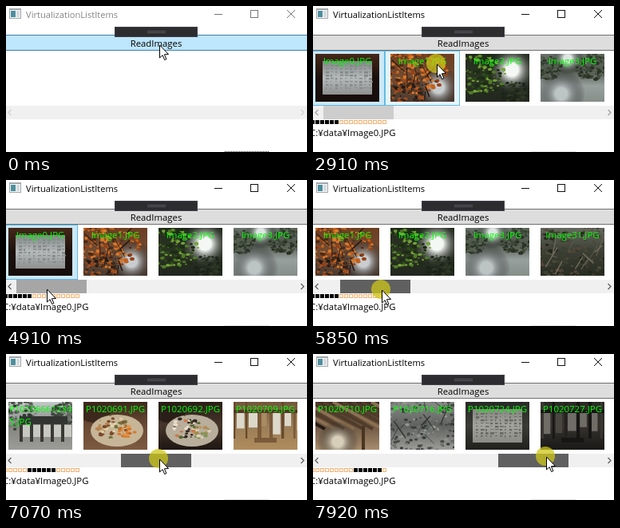
An HTML page with a canvas for the animation above (8000 ms loop, 377x183 px).

```html
<!DOCTYPE html>
<html lang="en">
<head>
<meta charset="utf-8">
<title>VirtualizationListItems</title>
<style>
html, body { margin: 0; width: 100%; height: 100%; overflow: hidden; background: #fff; }
canvas { display: block; }
</style>
</head>
<body>
<canvas id="stage" width="377" height="183"></canvas>
<script>
const W = 377, H = 183, LOOP = 8000, TICK = 76.8;
const PITCH = 94, COUNT = 16, VISIBLE = 4, PW = 80, PH = 60;
const TRACK_X = 13, STEP = 351 / COUNT, GRAB_X = 53;
const LOADED = 950, BAR_HOVER = 4760, DRAG = 5460;
const FONT = '"Open Sans", "Noto Sans", sans-serif';
const g = document.getElementById('stage').getContext('2d');

// pointer moves: start, end, target x, target y
const moves = [
  [0, 1, 192, 49], [2120, 2227, 179, 54], [2304, 2688, 155, 73],
  [3303, 3610, 62, 120], [3686, 3917, 212, 112], [4147, 4378, 50, 117],
  [4608, 4838, 51, 137], [5376, 5453, 53, 137],
  [5453, 6374, 133, 139], [6374, 7066, 192, 132], [7066, 7910, 292, 129]
];
// button down, button up, item selected afterwards
const clicks = [[710, 950, 0], [2910, 3150, 1], [3610, 3760, 0], [3990, 4140, 2], [4450, 4610, 0]];
const names = ['Image0', 'Image1', 'Image2', 'Image3', 'Image31', 'Image32', 'P101066612345',
  'P1020691', 'P1020692', 'P1020709', 'P1020710', 'P1020716', 'P1020724', 'P1020727'];

function rect(c, color, x, y, w, h) {
  c.fillStyle = color;
  c.fillRect(x, y, w, h);
}
function box(c, color, x, y, w, h) {
  c.strokeStyle = color;
  c.lineWidth = 1;
  c.strokeRect(x + 0.5, y + 0.5, w - 1, h - 1);
}
function trace(c, pts) {
  c.beginPath();
  for (let i = 0; i < pts.length; i += 2) c.lineTo(pts[i], pts[i + 1]);
}
function line(c, color, width, ...pts) {
  trace(c, pts);
  c.strokeStyle = color;
  c.lineWidth = width;
  c.stroke();
}
function oval(c, color, x, y, rx, ry = rx) {
  c.fillStyle = color;
  c.beginPath();
  c.ellipse(x, y, rx, ry, 0, 0, Math.PI * 2);
  c.fill();
}
function text(s, x, y, color, size, align = 'left') {
  g.font = `${size}px ${FONT}`;
  g.textAlign = align;
  g.fillStyle = color;
  g.fillText(s, x, y);
}

// --- photographs, suggested by tones and seeded shapes ---
let seed = 4711;
function rnd(a = 1, b = 0) {
  seed = (seed * 16807) % 2147483647;
  return b + (a - b) * seed / 2147483647;
}
const pick = list => list[Math.floor(rnd(list.length))];

function fade(c, colors, inset = 0) {
  const f = c.createLinearGradient(0, inset, 0, PH - inset);
  colors.forEach((color, i) => f.addColorStop(i / (colors.length - 1), color));
  rect(c, f, inset, inset, PW - 2 * inset, PH - 2 * inset);
}
function glow(c, x, y, r, color) {
  const f = c.createRadialGradient(x, y, r / 4, x, y, r);
  f.addColorStop(0, color);
  f.addColorStop(1, 'transparent');
  rect(c, f, 0, 0, PW, PH);
}
// leaves lie thickest around a centre
function leaves(c, colors, x, y, spread, n = 150) {
  for (let i = 0; i < n; i++) {
    const a = rnd(Math.PI * 2), d = spread * Math.sqrt(rnd()), s = rnd(3, 0.8);
    oval(c, pick(colors), x + d * 1.3 * Math.cos(a), y + d * Math.sin(a), s, s * 0.7);
  }
}
function twigs(c, color, n) {
  for (let i = 0; i < n; i++) {
    const x = rnd(PW), y = rnd(PH);
    line(c, color, rnd(1.6, 0.4), x, y, x + rnd(16, -16), y - rnd(26, 6));
  }
}
const grove = (tones, colors, twig, n) => c => {
  fade(c, tones);
  leaves(c, colors, 40, 32, 44, 260);
  twigs(c, twig, n);
};
const board = (frame, paper, ink) => c => {
  fade(c, frame);
  fade(c, paper, 9);
  for (let y = 14; y < 46; y += 4)
    for (let x = 13; x < 68; x += 6) rect(c, ink, x, y, rnd(5, 1), rnd(3, 0.6));
};
const dish = (table, plate, food, garnish) => c => {
  fade(c, table);
  oval(c, table[0], 14, 12, 20, 14);
  oval(c, plate, 42, 36, 33, 20);
  leaves(c, food, 36, 32, 15, 50);
  leaves(c, garnish, 54, 38, 8, 24);
};
const room = (tones, wood, light) => c => {
  fade(c, tones);
  for (let x = 4; x < PW; x += 15) {
    rect(c, pick(light), x, 14, rnd(12, 7), rnd(28, 16));
    rect(c, pick(wood), x - 4, 0, rnd(5, 2), 46);
  }
  rect(c, wood[0], 0, 10, PW, 4);
  rect(c, pick(wood), 26, 45, 28, 6);
};

const scenes = [
  board(['#45281a', '#1c100c', '#150d0a'], ['#7f8585', '#b6baba', '#8e9090'], '#858989'),
  c => {
    fade(c, ['#6d3e22', '#6f4c34', '#4b3b30']);
    glow(c, 60, 42, 28, '#c9cdd0');
    leaves(c, ['#c2601c', '#da7a2c', '#9a4217', '#4a2a18'], 30, 18, 32, 260);
    leaves(c, ['#3a2a1e', '#a04e20', '#231a14'], 20, 54, 18, 90);
    twigs(c, '#241b15', 14);
  },
  c => {
    fade(c, ['#222b1c', '#2b3324', '#22261f']);
    glow(c, 58, 20, 32, '#f4f7f4');
    leaves(c, ['#2b4a18', '#527d28', '#74a238', '#1c2c14'], 16, 26, 26, 170);
    leaves(c, ['#1c2418', '#2d3826'], 62, 48, 14, 90);
  },
  c => {
    fade(c, ['#6b726c', '#4d554b', '#98a09e', '#868e8a']);
    glow(c, 34, 6, 20, '#dfe4e4');
    leaves(c, ['#2a3326', '#3d4838', '#556050'], 8, 18, 15);
    leaves(c, ['#2a3326', '#3d4838', '#59624f'], 66, 16, 17);
    glow(c, 26, 50, 30, '#bcc4c4');
  },
  ...Array(2).fill(grove(['#65685f', '#3b3e32', '#292c22'],
    ['#24281c', '#3b4030', '#4c4b38', '#54463a'], '#6f695c', 20)),
  c => {
    fade(c, ['#c3c9c9', '#83847f', '#9c9c98']);
    leaves(c, ['#30372f', '#555d53', '#757b73'], 8, 16, 22);
    leaves(c, ['#3f463e', '#686e66'], 72, 14, 14);
    rect(c, '#323432', 14, 18, 60, 10);
    for (let x = 18; x < 74; x += 13) {
      rect(c, '#c8c8c2', x, 29, 9, 15);
      rect(c, '#3a3934', x - 4, 27, 4, 23);
    }
  },
  dish(['#3c281c', '#6a4a34', '#7d5a40'], '#c6b697',
    ['#b98450', '#6d6f3c', '#e3d2ac', '#7c4a2b'], ['#d87c30', '#c66a24', '#e39448']),
  dish(['#2a1e18', '#46352a', '#1d1613'], '#b9ae9c',
    ['#c97a50', '#55692f', '#e8decb', '#33271f'], ['#839455', '#ddd0b8', '#b98a50']),
  room(['#6f573c', '#9a7d58', '#b08c5c'], ['#513a24', '#68492c', '#7a5a38'], ['#dcd8ca', '#c4ab82', '#a98b62']),
  c => {
    fade(c, ['#3a2d24', '#6d5643', '#a78d6e']);
    for (let x = -50; x < PW; x += 12) line(c, pick(['#251b13', '#8b6f50', '#513b29']), 4, x, 0, x + 62, 34);
    glow(c, 28, 50, 26, '#d8cfba');
    rect(c, '#49351f', 58, 30, 4, 30);
  },
  grove(['#888b88', '#5f615e', '#9c9c99'], ['#484c48', '#70756f', '#91958f', '#383b38'], '#333633', 12),
  board(['#292a27', '#3a3b36', '#20211d'], ['#858580', '#a3a39d', '#8b8b85'], '#686863'),
  room(['#2b2926', '#35322e', '#1a1917'], ['#171614', '#24211f', '#3a3733'], ['#494640', '#6f6d66', '#2c2a27'])
];
const photos = scenes.map(paint => {
  const photo = document.createElement('canvas');
  photo.width = PW;
  photo.height = PH;
  paint(photo.getContext('2d'));
  return photo;
});

// --- window parts ---
function pointer(t) {
  const now = Math.floor(t / TICK) * TICK;
  let x = moves[0][2], y = moves[0][3];
  for (const [start, end, toX, toY] of moves) {
    const k = Math.min(1, Math.max(0, (now - start) / (end - start)));
    x += (toX - x) * k;
    y += (toY - y) * k;
  }
  return [Math.round(x), Math.round(y)];
}
function titleBar(active) {
  rect(g, '#a2a6aa', 4, 3, 15, 13);
  rect(g, '#f4f6f7', 5, 5, 13, 10);
  rect(g, '#4d8f9c', 6, 6, 6, 8);
  rect(g, '#d5dbde', 13, 6, 4, 8);
  text('VirtualizationListItems', 25, 15, active ? '#000' : '#858585', 11.15);
  const ink = active ? '#111' : '#777';
  rect(g, ink, 261, 10, 10, 1);
  box(g, ink, 306, 5, 10, 10);
  line(g, ink, 1, 352, 5, 362, 15);
  line(g, ink, 1, 362, 5, 352, 15);
}
function button(pressed, hover) {
  const [fill, edge] = pressed ? ['#c4e5f6', '#2c628b'] : hover ? ['#bee6fd', '#3c7fb1'] : ['#ddd', '#707070'];
  rect(g, edge, 0, 36, W, 20);
  rect(g, fill, 0, 37, W, 18);
  text('ReadImages', 188, 51, '#000', 11.35, 'center');
  rect(g, '#2d2d30', 136, 26, 104, 13);
  box(g, '#3f3f46', 136, 26, 104, 13);
  for (const y of [31, 33]) rect(g, '#58585e', 177, y, 23, 1);
}
function items(first, picked, active, hover) {
  for (let i = 0; i < VISIBLE; i++) {
    const n = first + i, x = i * PITCH - 4, name = names[n] + '.JPG';
    if (n === picked || i === hover) {
      const tint = n === picked && !active ? '218,218,218' : '38,160,218';
      rect(g, `rgba(${tint},${n === picked ? 0.24 : 0.12})`, x, 56, PITCH, 69);
      box(g, `rgba(${tint},.66)`, x, 56, PITCH, 69);
    }
    g.drawImage(photos[n], x + 7, 60);
    if (name.length > 13) {
      text(name.slice(0, 12), x + 8, 73, '#0f0', 11.4);
      text(name.slice(12), x + 8, 89, '#0f0', 11.4);
    } else {
      text(name, x + 47, 73, '#0f0', 11.45, 'center');
    }
  }
}
function scrollBar(t, first) {
  rect(g, '#f0f0f0', 0, 125, W, 17);
  const ink = t < LOADED ? '#cfcfcf' : t < BAR_HOVER ? '#a3a3a3' : '#606060';
  line(g, ink, 1.3, 6.5, 130, 3, 133.5, 6.5, 137);
  line(g, ink, 1.3, 369.5, 130, 373, 133.5, 369.5, 137);
  if (t < LOADED) return;
  const color = t < BAR_HOVER ? '#cdcdcd' : t < DRAG ? '#a6a6a6' : '#606060';
  rect(g, color, Math.floor(TRACK_X + first * STEP), 125, 88, 17);
}
function cells(first) {
  const start = Math.max(0, first - 1);
  for (let i = 0; i < COUNT; i++) {
    const x = i * 6 - 3;
    if (i >= start && i < start + VISIBLE + 2) rect(g, '#000', x, 143, 5, 5);
    else box(g, '#f0b070', x, 143, 5, 5);
  }
}
function cursor(x, y) {
  g.save();
  g.translate(x + 0.5, y);
  trace(g, [0, 0, 0, 16, 3.6, 12.7, 6.2, 18.6, 8.4, 17.6, 5.9, 11.8, 11, 11.5]);
  g.closePath();
  g.fillStyle = '#fff';
  g.fill();
  g.strokeStyle = '#000';
  g.lineWidth = 1;
  g.stroke();
  g.restore();
}

function draw(t) {
  const [x, y] = pointer(t);
  const active = t >= clicks[0][0];
  const held = t >= DRAG || clicks.some(([down, up]) => t >= down && t < up);
  const first = t < DRAG ? 0 : Math.max(0, Math.floor((x - GRAB_X) / STEP));
  rect(g, '#fff', 0, 0, W, H);
  titleBar(active);
  button(held && y < 56, y < 56);
  scrollBar(t, first);
  if (t >= LOADED) {
    const picked = clicks.filter(([down]) => t >= down + 70).pop()[2];
    const hover = y >= 56 && y < 125 ? Math.floor((x + 4) / PITCH) : -1;
    items(first, picked, t >= clicks[1][0], hover);
    cells(first);
    text(`C:¥data¥Image${picked}.JPG`, 103.5, 163, '#000', 11.4, 'right');
  }
  for (let i = 274; i < 330; i += 2) rect(g, active ? '#ccc' : '#333', i, 182, 1, 1);
  if (held) oval(g, 'rgba(205,198,25,.75)', x - 1, y - 1, 12);
  cursor(x, y);
}

const begin = performance.now();
function frame() {
  draw((performance.now() - begin) % LOOP);
  requestAnimationFrame(frame);
}
frame();
</script>
</body>
</html>
```
